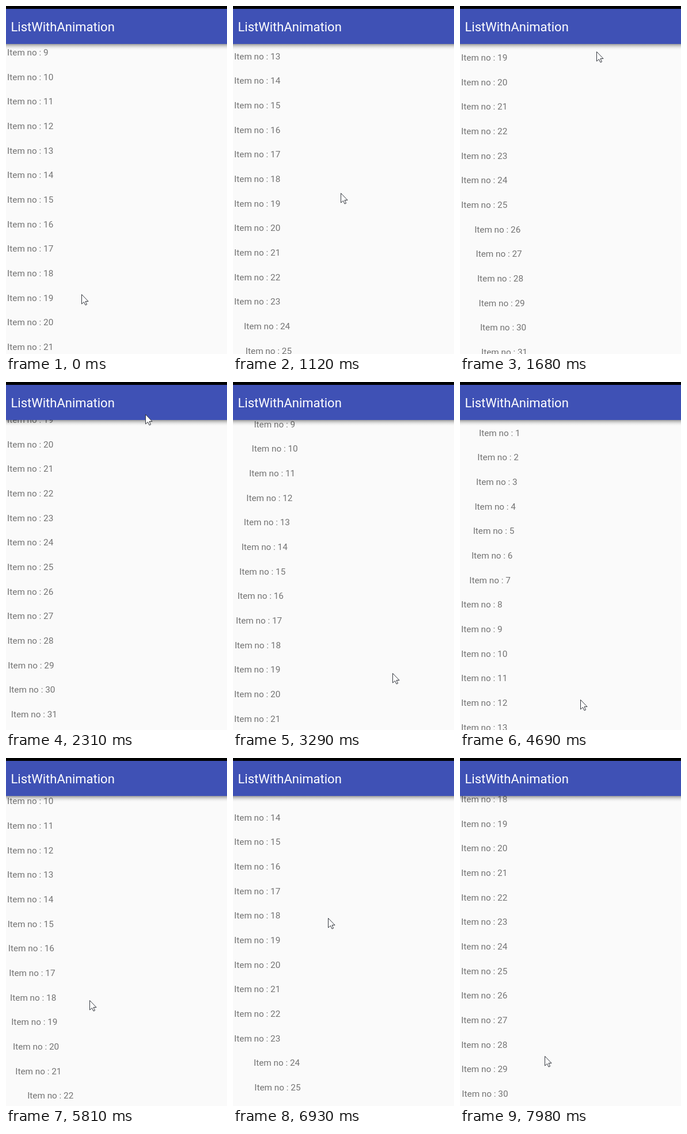
These frames come from a looping animation (384x605 px, 8000 ms). An HTML page with a canvas:

```html
<!DOCTYPE html>
<html lang="en">
<head>
<meta charset="utf-8">
<title>ListWithAnimation</title>
<style>
  html, body { margin: 0; width: 100%; height: 100%; overflow: hidden; background: #fafafa; }
  canvas { display: block; width: 384px; height: 605px; }
</style>
</head>
<body>
<canvas id="stage"></canvas>
<script>
const W = 384, H = 605, LOOP = 8000, TICK = 70;
const BAR_TOP = 5, BAR_BOTTOM = 66;
const ROW = 128 / 3, FIRST_BASELINE = 93.7;
const SLIDE = 35.6, SLIDE_MS = 1000;

// Hand movements: each eases the pointer and the list scroll to a new place.
// A skew below 1 shifts the speed to the start, above 1 to the end.
const rest = { x: 131, y: 501, scroll: 349 };
const moves = [
  { at: 70,   ms: 140,  skew: 1,   x: 136, y: 507, scroll: 349 },
  { at: 535,  ms: 225,  skew: 0.5, x: 187, y: 325, scroll: 513 },
  { at: 1260, ms: 640,  skew: 0.5, x: 242, y: 56,  scroll: 790.6 },
  { at: 2310, ms: 1190, skew: 0.7, x: 278, y: 524, scroll: 338.7 },
  { at: 3750, ms: 240,  skew: 1,   x: 328, y: 170, scroll: 338.7 },
  { at: 3990, ms: 600,  skew: 1,   x: 209, y: 552, scroll: 0 },
  { at: 4720, ms: 620,  skew: 1,   x: 307, y: 200, scroll: 335 },
  { at: 5400, ms: 240,  skew: 1,   x: 140, y: 483, scroll: 335 },
  { at: 5640, ms: 260,  skew: 1,   x: 147, y: 398, scroll: 420 },
  { at: 6644, ms: 560,  skew: 1.3, x: 195, y: 75,  scroll: 742 },
  { at: 7400, ms: 500,  skew: 1,   x: 147, y: 518, scroll: 742 }
];

const ease = u => (1 - Math.cos(Math.PI * u)) / 2;
const clamp01 = u => Math.min(1, Math.max(0, u));
const mix = (a, b, p) => a + (b - a) * p;

function stateAt(t) {
  let s = rest;
  for (const m of moves) {
    if (t < m.at) break;
    const p = ease(clamp01((t - m.at) / m.ms) ** m.skew);
    s = { x: mix(s.x, m.x, p), y: mix(s.y, m.y, p), scroll: mix(s.scroll, m.scroll, p) };
  }
  return s;
}

function visibleRange(scroll) {
  return [Math.max(1, Math.floor(scroll / ROW) + 1), Math.ceil((scroll + H - BAR_BOTTOM) / ROW)];
}

// Every row that scrolls into view starts a new slide; note when.
const binds = {};
(function recordBinds() {
  let [lo, hi] = visibleRange(rest.scroll);
  hi += 2; // the next two rows are already laid out
  for (let t = 0; t < LOOP; t += 5) {
    const [a, b] = visibleRange(stateAt(t).scroll);
    for (let n = a; n <= b; n++) {
      if (n < lo || n > hi) (binds[n] = binds[n] || []).push(t);
    }
    lo = a;
    hi = t < 700 ? Math.max(hi, b) : b;
  }
})();

function slideOffset(n, t) {
  const started = (binds[n] || []).filter(b => b <= t).pop();
  return started === undefined ? 0 : SLIDE * (1 - ease(clamp01((t - started) / SLIDE_MS)));
}

const canvas = document.getElementById("stage");
const ctx = canvas.getContext("2d");
const dpr = window.devicePixelRatio || 1;
canvas.width = W * dpr;
canvas.height = H * dpr;
ctx.scale(dpr, dpr);

function drawRows(scroll, t) {
  const [a, b] = visibleRange(scroll);
  ctx.fillStyle = "#737373";
  ctx.font = "15.3px Roboto, sans-serif";
  for (let n = a; n <= b; n++) {
    ctx.fillText("Item no : " + n, 2.1 + slideOffset(n, t), FIRST_BASELINE + (n - 1) * ROW - scroll);
  }
}

function drawBar() {
  const depth = 11;
  const shade = ctx.createLinearGradient(0, BAR_BOTTOM, 0, BAR_BOTTOM + depth);
  for (let u = 0; u <= 1; u += 0.25) {
    shade.addColorStop(u, `rgba(0,0,0,${0.38 * (1 - u) ** 2})`);
  }
  ctx.fillStyle = shade;
  ctx.fillRect(0, BAR_BOTTOM, W, depth);
  ctx.fillStyle = "#000";
  ctx.fillRect(0, 0, W, BAR_TOP);
  ctx.fillStyle = "#3f51b5";
  ctx.fillRect(0, BAR_TOP, W, BAR_BOTTOM - BAR_TOP);
  ctx.fillStyle = "#fff";
  ctx.font = "22px Roboto, sans-serif";
  ctx.fillText("ListWithAnimation", 8.5, 44);
}

function drawPointer(px, py) {
  const x = Math.round(px) + 0.5, y = Math.round(py) + 0.5;
  const arrow = [[0, 0], [0, 16.5], [4, 13], [6.5, 18.5], [9, 17.5], [6.5, 12], [11.5, 12]];
  ctx.beginPath();
  for (const [dx, dy] of arrow) ctx.lineTo(x + dx, y + dy);
  ctx.closePath();
  ctx.fillStyle = "#fff";
  ctx.fill();
  ctx.strokeStyle = "#34383f";
  ctx.lineWidth = 1;
  ctx.stroke();
}

function draw(t) {
  const { x, y, scroll } = stateAt(t);
  ctx.fillStyle = "#fafafa";
  ctx.fillRect(0, 0, W, H);
  drawRows(scroll, t);
  drawBar();
  drawPointer(x, y);
}

const begin = performance.now();
function frame() {
  const t = (performance.now() - begin) % LOOP;
  draw(Math.floor(t / TICK) * TICK);
  requestAnimationFrame(frame);
}
frame();
</script>
</body>
</html>
```
